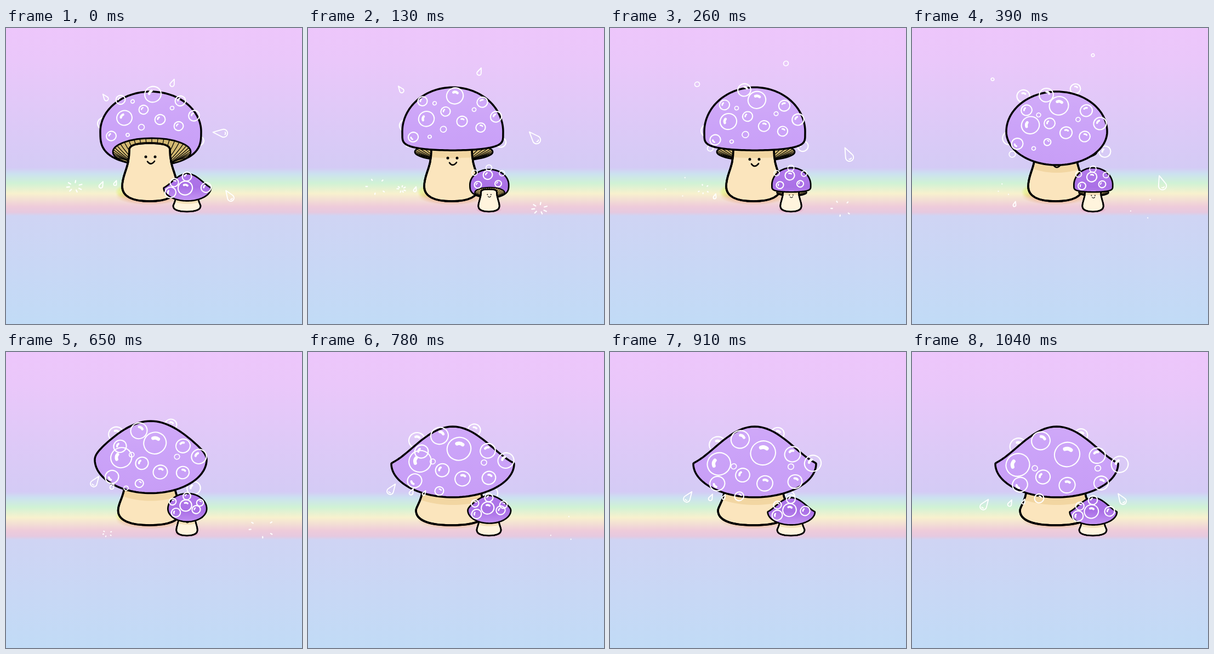
Recreate the animation shown at these times as an HTML page with a canvas. Size 540 by 540 pixels, loop 1170 ms.

```html
<!DOCTYPE html>
<html lang="en">
<head>
<meta charset="utf-8">
<title>Bubble mushrooms</title>
<style>
html, body { margin: 0; width: 100%; height: 100%; overflow: hidden; background: #d4cbf5; }
canvas { display: block; width: 100vw; height: 100vh; }
</style>
</head>
<body>
<canvas id="stage" width="540" height="540"></canvas>
<script>
const c = document.getElementById('stage').getContext('2d');
const STEP = 130, COUNT = 9, LAST = COUNT - 1, PI = Math.PI;
c.lineCap = c.lineJoin = 'round';

const clamp = v => Math.min(1, Math.max(0, v));
const wrap = k => (k + COUNT) % COUNT;
const noise = n => { const v = Math.sin(n * 127.1 + 4.7) * 43758.5; return v - Math.floor(v); };

// Progress through one loop, all from the step number
const fall = k => { const u = clamp(k / LAST); return u * u * (3 - 2 * u); };
const drift = k => clamp((k - 4) / 4);
const sag = k => clamp((k - 4) / 2);
const hop = k => Math.max(0, Math.sin(PI * Math.min(k, 3) / 3));

// Bubbles sliding on the caps: x, y, r, total dx, dy, first step, end step
const behind = [
  [178, 174, 11, -24, 84, 0, 5],
  [183, 209, 5, -5, 67, 0, 5],
  [352, 206, 9, -38, 62, 0, 8],
  [203, 102, 10, -9, 70, 3],
  [298, 92, 8, 10, 60, 3]
];
const onBig = [
  [268, 121, 15, 15, 66], [216, 164, 14, -23, 42], [251, 149, 8.5, -12, 79], [281, 167, 9.5, 2, 76],
  [315, 179, 8.5, 30, 60], [343, 160, 10, 36, 45], [192, 197, 9, 5, 45], [247, 181, 5.5, -15, 86],
  [231, 134, 3.3, -7, 78], [222, 195, 3, -12, 78, 0, 6], [303, 146, 3.5, 36, 66], [209, 131, 8.5, -4, 60, 0, 7],
  [318, 133, 9.5, 20, 56], [245, 104, 11, -10, 58, 2]
];
const onSmall = [
  [328, 268, 8.5, -1, 24], [310, 286, 6.5, -10, 14], [347, 284, 6, 18, 7],
  [304, 264, 5, 3, 18], [354, 265, 5, 10, 20, 0, 6], [330, 255, 5.5, 0, 16]
];
// Flying drops: first step, steps in the air, x, y, vx, vy, gravity, r
const flights = [
  [0, 4, 397, 192, 20, 2, 10, 8.5],
  [8, 2, 385, 272, 25, 38, 0, 7],
  [5, 4, 160, 240, -10, 14, 0, 7],
  [5, 5, 193, 247, -5, 10.4, 0, 4],
  [6, 7, 211, 259, -4, 6.5, .7, 3]
];
// Mist rising from the top: x, y, vx, vy
const mist = [[183, 129, -12, -16], [303, 103, 9, -22]];

function ramp(y0, y1, ...stops) {
  const g = c.createLinearGradient(0, y0, 0, y1);
  for (const [y, col] of stops) g.addColorStop((y - y0) / (y1 - y0), col);
  return g;
}
const sky = ramp(0, 540, [0, '#edc6fb'], [60, '#eac7fa'], [255, '#d4cbf5'], [266, '#cce1f0'],
  [283, '#d0f2d5'], [302, '#f8f1ce'], [326, '#eecbda'], [336, '#e6c9df'], [343, '#cfd4f4'], [540, '#c1dbf6']);

const big = { x: 262, y: 316, size: 1, line: 3.5, flesh: '#fbe5bd', glow: '232,160,110',
  skin: ramp(110, 265, [110, '#d2acf8'], [180, '#cba3f8'], [265, '#c79df6']) };
const small = { x: 330, y: 335, size: .385, line: 7, flesh: '#fff4dd', glow: '222,130,165',
  skin: ramp(110, 265, [110, '#b37bec'], [200, '#aa70e6'], [265, '#c596f4']) };

function ink(w, col = '#000') {
  c.lineWidth = w;
  c.strokeStyle = col;
  c.stroke();
}

function paint(fill, line) {
  c.fillStyle = fill;
  c.fill();
  ink(line);
}

function glow(x, y, rx, ry, rgb) {
  c.save();
  c.translate(x, y);
  c.scale(rx, ry);
  const g = c.createRadialGradient(0, 0, .6, 0, 0, 1);
  g.addColorStop(0, `rgba(${rgb},.55)`);
  g.addColorStop(1, `rgba(${rgb},0)`);
  c.fillStyle = g;
  c.fillRect(-1, -1, 2, 2);
  c.restore();
}

function pose(k) {
  const s = sag(k), h = hop(k), tilt = k === 0 ? 1 : 0;
  return { tilt, w: 92 + 20 * s, y: 189 + 15 * s, up: 73 - 5 * s + 9 * h, down: 61 - 31 * h,
    flare: .85 * s, box: 1 - .7 * h - .35 * tilt };
}

// An ellipse whose upper half can flare into a brim and lower half can flatten
function capPath(p) {
  c.beginPath();
  for (let i = 0; i < 120; i++) {
    const a = i * PI / 60, s = Math.abs(Math.sin(a));
    const y = a < PI ? p.down * s ** p.box : -p.up * ((1 - p.flare) * s + p.flare * s ** 3.5);
    c.lineTo(264 + p.w * Math.cos(a), p.y + y);
  }
  c.closePath();
}

function stemPath(p) {
  const foot = 50 + (p.w - 92) * .75, neck = foot - 13, top = p.y + 29, mid = top + 38;
  c.beginPath();
  c.moveTo(262, top - 8);
  for (const d of [-1, 1]) {
    const x = w => 262 + d * w;
    c.moveTo(262, top - 8);
    c.quadraticCurveTo(x(neck), top - 8, x(neck), top + 4);
    c.bezierCurveTo(x(neck), mid, x(foot), mid + 10, x(foot), 289);
    c.bezierCurveTo(x(foot), 308, x(foot * .6), 316, 262, 316);
  }
}

function gills(p, line) {
  const y = p.y + 37, rx = 71, ry = 16 + 9 * p.tilt;
  c.save();
  c.beginPath();
  c.ellipse(266, y, rx, ry, 0, 0, 7);
  paint('#d3b972', line * .8);
  c.clip();
  for (let i = 0; i <= 26; i++) {
    const a = PI * (.85 + .05 * i), u = rx * Math.cos(a), v = ry * Math.sin(a);
    c.beginPath();
    c.moveTo(266 + u, y + v);
    c.quadraticCurveTo(266 + u * .82, y + v * .4 + ry * .3, 266 + u * .45, y + ry * .9);
    ink(line * .35);
  }
  c.restore();
}

function face(y) {
  c.fillStyle = '#000';
  c.beginPath();
  c.arc(255, y, 2.5, 0, 7);
  c.arc(272, y, 2.5, 0, 7);
  c.fill();
  c.beginPath();
  c.moveTo(258, y + 8.5);
  c.quadraticCurveTo(264, y + 17, 271, y + 8);
  ink(2.6);
}

function stem(m, p, k) {
  c.save();
  stemPath(p);
  paint(m.flesh, m.line);
  c.clip();
  if (!p.tilt) {
    c.translate(0, 14);
    capPath(p);
    c.fillStyle = 'rgba(226,190,120,.38)';
    c.fill();
  }
  c.restore();
  stemPath(p);
  ink(m.line);
  if (k < 5) face(235 + 2.2 * k);
}

function mushroom(m, k) {
  const p = pose(k);
  const cap = () => { capPath(p); paint(m.skin, m.line); };
  c.save();
  c.translate(m.x, m.y);
  c.scale(m.size, m.size);
  c.translate(-262, -316);
  glow(262, 307, 62, 16, m.glow);
  if (p.tilt) cap();
  gills(p, m.line);
  stem(m, p, k);
  if (!p.tilt) cap();
  c.restore();
}

function ring(x, y, r, shine) {
  c.beginPath();
  c.ellipse(x, y, r, r * .95, -.4, 0, 7);
  ink(r < 6 ? 1.7 : 2.1, '#fff');
  if (r < 6) return;
  c.beginPath();
  c.arc(x, y, r * .46, shine - .55, shine + .55);
  ink(r * .3, '#fff');
}

function bubbles(list, k) {
  list.forEach(([x, y, r, dx, dy, from = 0, to = COUNT], i) => {
    if (k < from || k >= to) return;
    const f = fall(k);
    ring(x + dx * drift(k), y + dy * f, r * (1 + .55 * f), 3.8 + (k ? 3 * (noise(i) - .5) : 0));
  });
}

function drop(x, y, r, dir) {
  c.beginPath();
  c.moveTo(x + 2.3 * r * Math.cos(dir), y + 2.3 * r * Math.sin(dir));
  c.arc(x, y, r * .85, dir + 1.1, dir - 1.1 + 2 * PI);
  c.closePath();
  ink(1.9, '#fff');
  if (r < 6) return;
  c.beginPath();
  c.arc(x, y, r * .4, dir + 2.4, dir + 3.8);
  ink(1.9, '#fff');
}

// Dashes that spread and shrink to dots
function splash(x, y, r, age) {
  const n = 7 - 2 * age, reach = r * (1.1 + .9 * age), len = Math.max(.1, r * (.6 - .3 * age));
  c.beginPath();
  for (let i = 0; i < n; i++) {
    const a = 2 * PI * (i + noise(i + r) * .6) / n, u = Math.cos(a) * 1.2, v = Math.sin(a) * .9;
    c.moveTo(x + u * reach, y + v * reach);
    c.lineTo(x + u * (reach + len), y + v * (reach + len));
  }
  ink(2.2, '#fff');
}

function fly(k) {
  for (const [from, air, x, y, vx, vy, g, r] of flights) {
    const t = wrap(k - from), at = u => [x + vx * u, y + vy * u + g * u * u];
    if (t < air) drop(...at(t), r, Math.atan2(-vy - 2 * g * t, -vx));
    else if (t < air + 3) splash(...at(air - .5), r, t - air);
  }
  for (const [x, y, vx, vy] of mist) {
    const px = x + vx * k, py = y + vy * k + 1.4 * k * k;
    if (k < 2) drop(px, py, 4.5, Math.atan2(vy, vx));
    else if (k < 5) ring(px, py, 4.5 - 1.8 * (k - 2), 0);
  }
}

function draw(k) {
  const late = wrap(k - 1); // the small one follows a step behind
  c.fillStyle = sky;
  c.fillRect(0, 0, 540, 540);
  glow(215, 299, 16, 12, '226,240,120');
  bubbles(behind, k);
  mushroom(big, k);
  bubbles(onBig, k);
  mushroom(small, late);
  bubbles(onSmall, late);
  fly(k);
}

const start = performance.now();
let shown = -1;
function tick() {
  const k = Math.floor((performance.now() - start) / STEP) % COUNT;
  if (k !== shown) draw(shown = k);
  requestAnimationFrame(tick);
}
tick();
</script>
</body>
</html>
```
